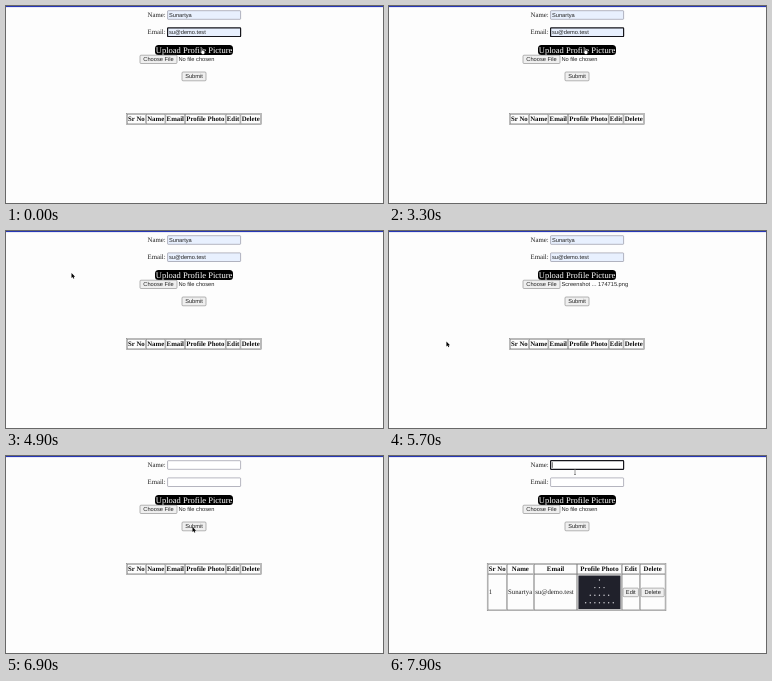
Animation, 377 px wide and 197 px high, one loop 8 s. Source, as an HTML page:

```html
<!DOCTYPE html>
<html lang="en">
<head>
<meta charset="utf-8">
<title>Profile form</title>
<style>
  html, body { margin: 0; width: 100%; height: 100%; overflow: hidden; background: #fdfdfd; }
  svg { display: block; width: 377px; height: 197px; }
  text { font: 6.8px "Liberation Serif", serif; fill: #222; white-space: pre; text-rendering: geometricPrecision; }
  .ui { font: 5.7px "Liberation Sans", sans-serif; }
  .bold { font-weight: bold; fill: #111; }
  .mid { text-anchor: middle; }
  .label { font-size: 8.5px; fill: #fff; }
  .line { fill: none; stroke: #777; stroke-width: .5; }
  .button { fill: #efefef; stroke: #858585; stroke-width: .6; }
  .field { fill: #fff; stroke: #858595; stroke-width: .6; }
  .field.filled { fill: #e8f0fe; }
  .field.focus { stroke: #16161c; stroke-width: 1.2; }
  .caret { stroke: #000; stroke-width: .6; }
</style>
</head>
<body>
<svg id="stage" viewBox="0 0 377 197"></svg>
<script>
const DURATION = 8000;
const person = { name: "Sunartya", email: "su@demo.test" };
const headings = ["Sr No", "Name", "Email", "Profile Photo", "Edit", "Delete"];
const GAP = 0.85;

const rect = (x, y, w, h, cls, extra = "") =>
  `<rect x="${x}" y="${y}" width="${w}" height="${h}" class="${cls}" ${extra}/>`;
const text = (x, y, str, cls = "", id = "") =>
  `<text x="${x}" y="${y}" class="${cls}" id="${id}">${str}</text>`;
const button = (x, y, w, h, str) =>
  rect(x, y, w, h, "button", 'rx="1"') + text(x + w / 2, y + h / 2 + 2, str, "ui mid");
const field = (id, y) =>
  rect(161.6, y, 73, 8.6, "field", `id="${id}" rx=".6"`) +
  text(163, y + 6.2, person[id], "ui", id + "Text");

// Bordered table; each row is its height and a function drawing a cell's content.
function table(left, widths, rows) {
  const total = widths.reduce((sum, w) => sum + w + GAP, GAP);
  let y = 107.6 + GAP, out = "";
  for (const [height, draw] of rows) {
    let x = left + GAP;
    widths.forEach((w, i) => {
      out += rect(x, y, w, height, "line") + draw(i, x, y, w, height);
      x += w + GAP;
    });
    y += height + GAP;
  }
  return rect(left, 107.6, total, y - 107.6, "line") + out;
}

const headRow = [9.4, (i, x, y, w) => text(x + w / 2, y + 6.9, headings[i], "bold mid")];

function photo(x, y, w, h) {
  let out = rect(x + 0.8, y + 0.8, w - 1.6, h - 1.6, "", 'fill="#20212b"');
  for (let row = 0; row < 4; row++)
    for (let k = -row; k <= row; k++)
      out += `<circle cx="${x + w / 2 + k * 4.6}" cy="${y + 5.3 + row * 7.6}" r=".7" fill="#d5d5da"/>`;
  return out;
}

const dataRow = [35.2, (i, x, y, w, h) => {
  const mid = y + h / 2;
  if (i < 3) return text(x + 0.8, mid + 2.1, ["1", person.name, person.email][i]);
  if (i === 3) return photo(x, y, w, h);
  return button(x + 0.9, mid - 4.2, w - 1.8, 8.6, headings[i]);
}];

stage.innerHTML =
  rect(0, 0, 377, 1.1, "", 'fill="#2737b5"') +
  text(141.5, 11, "Name:") + field("name", 4.7) +
  text(141.5, 28.2, "Email:") + field("email", 21.9) +
  rect(149, 39, 78, 10, "", 'rx="3.5"') + text(188, 46.9, "Upload Profile Picture", "label mid") +
  button(134, 49.2, 37, 8.3, "Choose File") + text(172.4, 55.3, "", "ui", "fileName") +
  button(176, 66, 24, 8.8, "Submit") +
  `<g id="emptyTable">${table(120.4, [18.3, 18.6, 18.9, 39.6, 14, 19.6], [headRow])}</g>` +
  `<g id="fullTable">${table(98.2, [18.3, 26.3, 42.4, 43.7, 17.2, 24.9], [headRow, dataRow])}</g>` +
  '<path id="caret" class="caret"/>' +
  `<g id="pointer">
    <path id="arrow" d="M0 0v5l1.2-1 .8 1.7 .8-.4-.8-1.6h1.6z"/>
    <path id="hand" d="M1 0h1v2.4l2.2.5v2l-.7 1.4H1.4L0 3.8l1-.4z" fill="#fff" stroke="#000" stroke-width=".4"/>
    <path id="beam" d="M-1 0h2M0 0v5M-1 5h2" fill="none" stroke="#555" stroke-width=".6"/>
  </g>`;

// Pointer path: [time, x, y]
const path = [
  [0, 194.5, 42], [3800, 194.5, 42], [4100, 196, 42], [4700, 190, 42], [4900, 65.5, 42],
  [5000, 41, 45], [5200, 6, 48], [5500, 6, 48], [5600, 42, 113], [6300, 150, 96],
  [6400, 150, 96], [6600, 186.5, 71], [7300, 186.5, 71], [7700, 186, 13.5], [8000, 186, 13.5]
];

function pointerAt(t) {
  const i = path.findIndex(key => key[0] > t);
  const [t0, x0, y0] = path[i - 1], [t1, x1, y1] = path[i];
  const k = (t - t0) / (t1 - t0);
  return [x0 + (x1 - x0) * k, y0 + (y1 - y0) * k];
}

const show = (el, on) => el.setAttribute("visibility", on ? "visible" : "hidden");
const within = (t, from, to) => t >= from && t < to;

function render(now) {
  const t = Math.floor(now % DURATION / 100) * 100;
  const filled = t < 6800, saved = t >= 7100;
  const nameFocus = t >= 7900, emailFocus = t < 3900;

  for (const [id, focus] of [["name", nameFocus], ["email", emailFocus]]) {
    const box = document.getElementById(id);
    box.classList.toggle("filled", filled);
    box.classList.toggle("focus", focus);
    show(document.getElementById(id + "Text"), filled);
  }
  fileName.textContent = within(t, 5600, 6800) ? "Screenshot ... 174715.png" : "No file chosen";
  show(emptyTable, !saved);
  show(fullTable, saved);

  const blink = within(t, 700, 1200) || within(t, 1700, 2300) || within(t, 2800, 3300);
  const caretX = 163.3 + (nameFocus ? 0 : emailText.getComputedTextLength());
  caret.setAttribute("d", `M${caretX} ${nameFocus ? 6.2 : 23.4}v5.6`);
  show(caret, nameFocus || blink);

  const [x, y] = pointerAt(t);
  const kind = y < 24 ? beam : within(t, 0, 4800) ? hand : arrow;
  pointer.setAttribute("transform", `translate(${x} ${y})`);
  for (const shape of [arrow, hand, beam]) show(shape, shape === kind && !within(t, 5400, 5600));

  requestAnimationFrame(render);
}
requestAnimationFrame(render);
</script>
</body>
</html>
```
